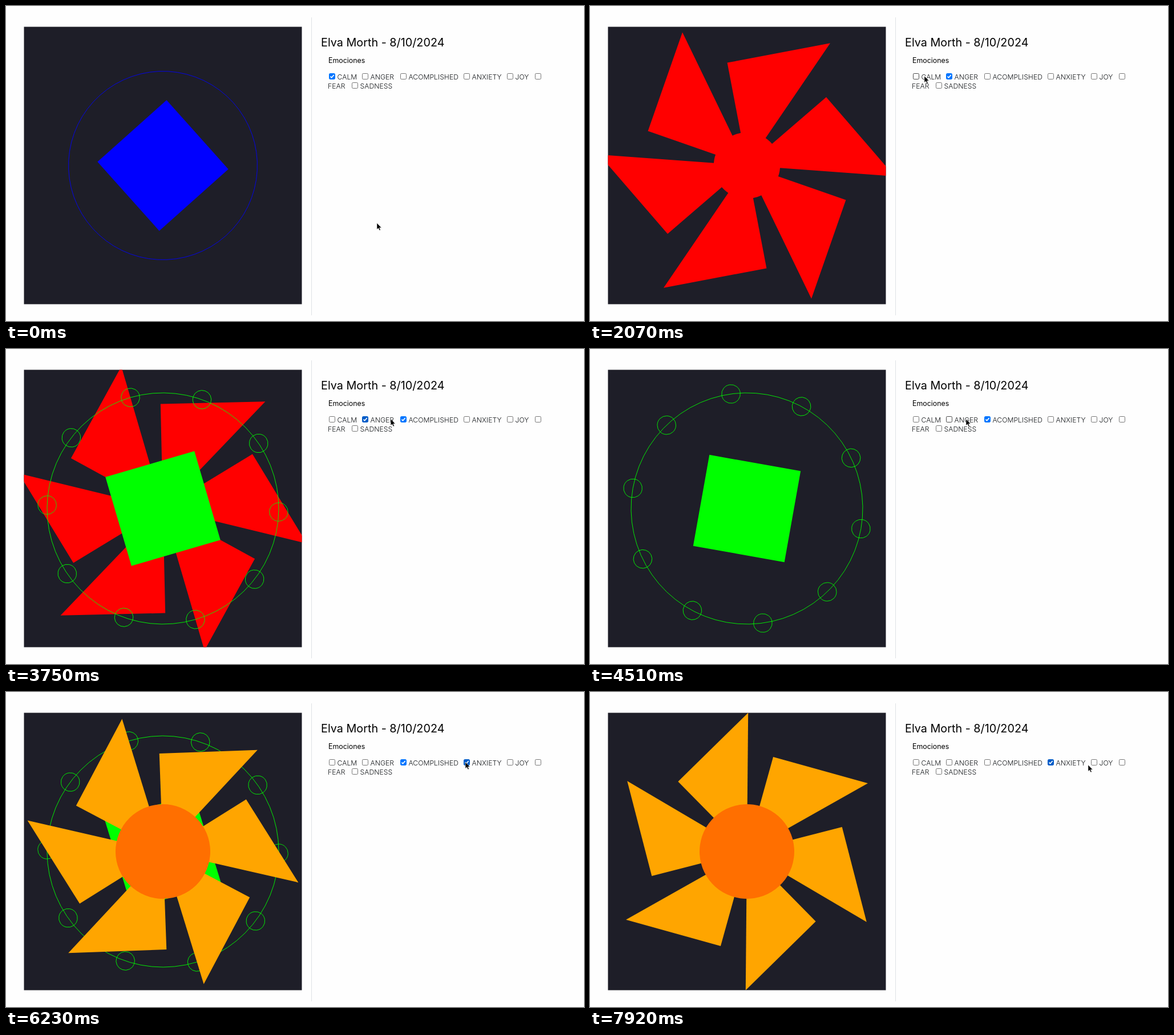
These frames come from a looping animation (1013 by 553 pixels, 8 s). An HTML page:

```html
<!DOCTYPE html>
<html lang="es">
<head>
<meta charset="utf-8">
<title>Emociones</title>
<style>
  html, body { margin: 0; width: 100%; height: 100%; overflow: hidden; background: #fefefe; }
  svg { display: block; width: 1013px; height: 553px; }
  text { font-family: Inter, "Open Sans", sans-serif; fill: #000; }
  .label { font-size: 12.2px; font-weight: 300; fill: #14171a; }
  .box rect { fill: #fff; stroke: #767676; }
  .box path { fill: none; stroke: #fff; stroke-width: 1.7; visibility: hidden; }
  .box.hover rect { stroke: #4a4a4a; }
  .box.on rect { fill: #0075ff; stroke: #0075ff; }
  .box.on.hover rect { fill: #005cc8; stroke: #005cc8; }
  .box.on path { visibility: visible; }
</style>
</head>
<body>
<svg viewBox="0 0 1013 553">
  <clipPath id="panel"><rect x="31.5" y="36.5" width="487" height="487"/></clipPath>
  <rect x="31.5" y="36.5" width="487" height="487" fill="#1e1e28"/>
  <g clip-path="url(#panel)"><g id="art" transform="translate(275 280)"></g></g>
  <path d="M535.5 20V543" stroke="#dee2e6"/>
  <text x="552" y="71" font-size="19.8">Elva Morth - 8/10/2024</text>
  <text x="565" y="100" font-size="12.4">Emociones</text>
  <g id="form"></g>
  <path id="cursor" d="M0 0V11.2L2.6 8.9L4.5 13L6.3 12.2L4.5 8.3H8Z" fill="#000" stroke="#fff" stroke-width=".5"/>
</svg>
<script>
const LOOP = 8000;
const START_ANGLE = 138.2;
const SPEED = 0.0362; // degrees per ms for each visible shape
const ROW = 123;

const art = document.getElementById('art');
const form = document.getElementById('form');
const cursor = document.getElementById('cursor');

function add(parent, tag, attrs = {}, text = '') {
  const el = document.createElementNS('http://www.w3.org/2000/svg', tag);
  for (const name in attrs) el.setAttribute(name, attrs[name]);
  el.textContent = text;
  return parent.appendChild(el);
}

// Shapes
function blades(group, radius, fill) {
  for (let i = 0; i < 6; i++)
    add(group, 'path', { d: `M0 0H${radius}L${radius / 2} ${-radius / 2}Z`, fill, transform: `rotate(${i * 60})` });
}
const disc = (group, r, fill) => add(group, 'circle', { r, fill });
const square = (group, fill) => add(group, 'rect', { x: -81.2, y: -81.2, width: 162.4, height: 162.4, fill });
const ring = (group, r, stroke, attrs) =>
  add(group, 'circle', { r, stroke, fill: 'none', 'stroke-width': .82, ...attrs });

const [calm, anger, acomplished, anxiety] = Array.from({ length: 4 }, () => add(art, 'g'));

square(calm, '#00f');
const calmRing = ring(calm, 158, '#00f');

blades(anger, 259.7, '#f00');
const angerCore = disc(anger, 58, '#f00');

square(acomplished, '#0f0');
ring(acomplished, 203, '#0f0');
for (let i = 0; i < 10; i++) ring(acomplished, 16.3, '#0f0', { cx: 203, transform: `rotate(${i * 36})` });

blades(anxiety, 243.5, '#ffa500');
disc(anxiety, 83, '#ff6f00');

// Checkboxes
function addBox(name, x, y = 119, labelX = x + 13.5, labelY = y + 10.2) {
  const box = add(form, 'g', { class: 'box', transform: `translate(${x - .5} ${y - .5})` });
  add(box, 'rect', { width: 10, height: 10, rx: 1.8 });
  add(box, 'path', { d: 'M2 5.2L4.1 7.3L8.2 2.5' });
  add(form, 'text', { class: 'label', x: labelX, y: labelY }, name);
  return box;
}

const options = [
  { name: 'CALM', x: 567, end: 620, shape: calm, from: 0, until: 1954 },
  { name: 'ANGER', x: 625, end: 686, shape: anger, from: 826, until: 4231 },
  { name: 'ACOMPLISHED', x: 692, end: 797, shape: acomplished, from: 3450, until: 7077 },
  { name: 'ANXIETY', x: 803, end: 874, shape: anxiety, from: 6215, until: LOOP }
];
for (const option of options) option.box = addBox(option.name, option.x);
addBox('JOY', 879);
addBox('FEAR', 928, 119, 564, 145.3);
addBox('SADNESS', 607, 135);

// Every visible shape advances the shared angle; clearing a box restarts it
function angleAt(t) {
  const reset = Math.max(0, ...options.map(o => o.until).filter(end => end <= t));
  const turned = options.reduce((sum, o) =>
    sum + Math.max(0, Math.min(t, o.until) - Math.max(reset, o.from)), 0);
  return (reset ? 0 : START_ANGLE) + SPEED * turned;
}

// The pointer visits each box that is clicked: [time, x, y]
const stops = [
  [0, 650, 381], [780, 631], [1190, 632], [1954, 572], [2070, 586], [2930, 685], [3230, 706],
  [3450, 697], [4231, 631], [4510, 659], [5880, 841], [6215, 807], [7077, 697], [7920, 873, 128], [LOOP, 873, 128]
];

function pointerAt(t) {
  const i = stops.findIndex(stop => stop[0] > t);
  const [t0, x0, y0 = ROW] = stops[i - 1];
  const [t1, x1, y1 = ROW] = stops[i];
  const k = (t - t0) / (t1 - t0);
  return [x0 + (x1 - x0) * k, y0 + (y1 - y0) * k];
}

// The picture refreshes in even steps of roughly 132 ms between these beats
const beats = [0, 140, 950, 2070, 2930, 4510, 6230, 7920, LOOP];

function snap(t) {
  const i = beats.findIndex(beat => beat > t);
  const start = beats[i - 1], span = beats[i] - start;
  const step = span / Math.max(1, Math.round(span / 132));
  return start + Math.floor((t - start) / step) * step;
}

function draw(t) {
  const angle = angleAt(t);
  const [px, py] = pointerAt(t);
  const pulse = Math.sin(angle * Math.PI / 180);

  calmRing.setAttribute('r', 158 + 11.2 * pulse);
  angerCore.setAttribute('r', 57.6 + 8.2 * pulse);
  cursor.setAttribute('transform', `translate(${px} ${py})`);

  for (const { box, shape, x, end, from, until } of options) {
    const on = t >= from && t < until;
    box.classList.toggle('on', on);
    box.classList.toggle('hover', px >= x && px < end && py < ROW + 10);
    shape.setAttribute('visibility', on ? 'visible' : 'hidden');
    shape.setAttribute('transform', `rotate(${angle})`);
  }
}

const begin = performance.now();
function frame() {
  draw(snap((performance.now() - begin) % LOOP));
  requestAnimationFrame(frame);
}
frame();
</script>
</body>
</html>
```
